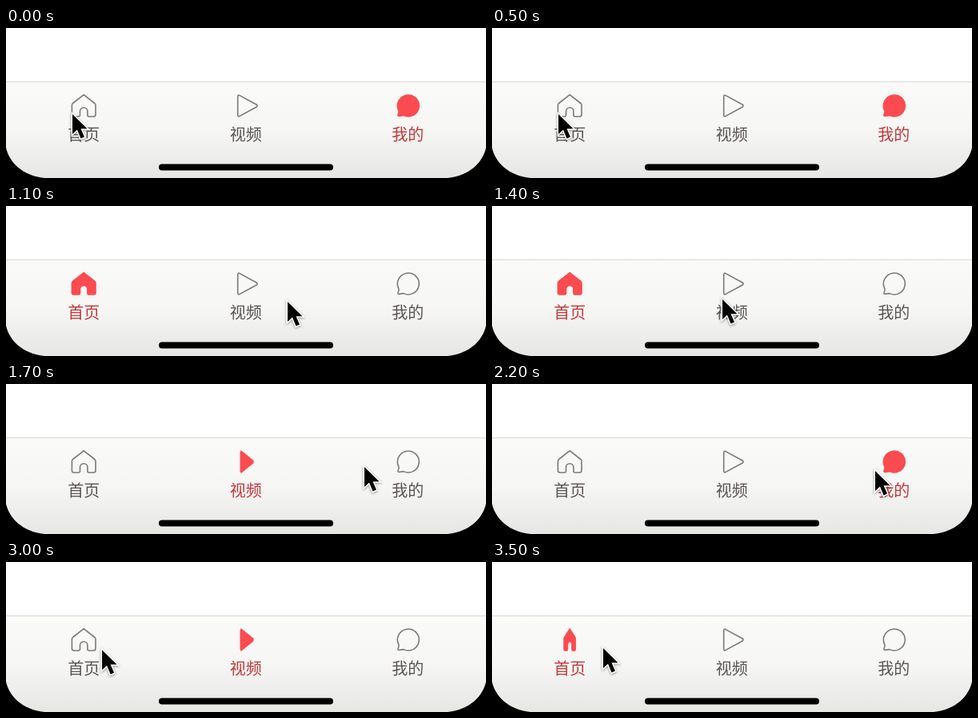
An HTML page that plays this animation: 600x188 px, repeating every 3600 ms.

```html
<!DOCTYPE html>
<html lang="zh-CN">
<head>
<meta charset="utf-8">
<title>标签栏</title>
<style>
  html, body { margin: 0; width: 100%; height: 100%; overflow: hidden; background: #fff; }
  svg { display: block; width: 600px; height: 188px; }
  text { font: 20px "Noto Sans CJK SC", "Noto Sans CJK", sans-serif; text-anchor: middle; fill: #595453; }
  .tab path { fill: none; stroke: #7d7978; stroke-width: 1.6; stroke-linejoin: round; }
  .tab.on path { fill: #fa4b50; stroke: #fa4b50; }
  .tab.on text { fill: #c5383a; }
  #cursor { filter: drop-shadow(0 1.5px 1.5px #0006); }
</style>
</head>
<body>
<svg viewBox="0 0 600 188">
  <defs>
    <linearGradient id="bar" x2="0" y2="1">
      <stop stop-color="#fafaf8"/>
      <stop offset=".5" stop-color="#f6f6f4"/>
      <stop offset="1" stop-color="#e6e6e4"/>
    </linearGradient>
  </defs>
  <rect y="68" width="600" height="120" fill="url(#bar)"/>
  <rect y="67" width="600" height="1" fill="#d9d9d7"/>
  <path d="M0 150C4 168 20 185 48 188H0ZM600 150C596 168 580 185 552 188H600Z"/>
  <rect x="191" y="170.5" width="218" height="8" rx="4"/>

  <g class="tab" transform="translate(97.2)">
    <path d="M0 83.6L13.8 94.5Q14.8 95.4 14.8 97V108.5Q14.8 111 12.3 111H6.5Q4.7 111 4.7 109V104.5A4.7 4.7 0 0 0-4.7 104.5V109Q-4.7 111-6.5 111H-12.3Q-14.8 111-14.8 108.5V97Q-14.8 95.4-13.8 94.5Z"/>
    <text y="140.5">首页</text>
  </g>
  <g class="tab" transform="translate(299.7)">
    <path d="M-10 86.2Q-10 83.2-7.5 84.6L13.4 96Q15.4 97.5 13.4 99L-7.5 110.4Q-10 111.8-10 108.8Z"/>
    <text y="140.5">视频</text>
  </g>
  <g class="tab" transform="translate(502.3)">
    <path d="M-12.3 109.8Q-12.7 109-11.7 107Q-11 105-11.5 103.5A13.45 13.45 0 1 1-5.3 109.6Q-7.3 109.8-10.3 110.3Q-12 110.6-12.3 109.8Z"/>
    <text y="140.5">我的</text>
  </g>

  <circle id="press" r="42.8" fill="none" stroke="#000" stroke-width="2.8"/>
  <path id="cursor" d="M1 2V27L7 21.5L11.5 32.5L16 30.6L11.5 20.3H19.5Z"
        stroke="#fff" stroke-width="3" paint-order="stroke"/>
</svg>
<script>
const LOOP = 3600, STEP = 100, SPIN = 250;
const HOME = 0, VIDEO = 1, MINE = 2;

// [time, x, y]
const path = [
  [0, 82, 106], [800, 82, 106], [1100, 351, 118], [1300, 287, 115], [1400, 287, 115],
  [1700, 447, 102], [1900, 480, 107], [2200, 478, 107], [2600, 287, 115], [2700, 287, 115],
  [3100, 88, 107], [3300, 86, 106], [3500, 138, 106], [3600, 138, 106]
];
// [time, selected tab]
const selections = [
  [-SPIN, MINE], [833, HOME], [1517, VIDEO], [1955, MINE], [2817, VIDEO], [3417, HOME]
];
const presses = [600, 1300, 2600];

const tabs = [...document.querySelectorAll(".tab")];
const cursor = document.getElementById("cursor");
const press = document.getElementById("press");

function cursorAt(t) {
  const i = path.findIndex(point => point[0] > t);
  const [t0, x0, y0] = path[i - 1], [t1, x1, y1] = path[i];
  const p = (t - t0) / (t1 - t0), ease = p * p * (3 - 2 * p);
  return [x0 + (x1 - x0) * ease, y0 + (y1 - y0) * ease];
}

function draw(t) {
  const [x, y] = cursorAt(t);
  cursor.setAttribute("transform", `translate(${x} ${y})`);
  press.setAttribute("transform", `translate(${x} ${y + 1.7})`);
  press.style.display = presses.some(p => t >= p && t < p + STEP) ? "" : "none";

  const [start, selected] = selections.findLast(s => s[0] <= t);
  const turn = Math.min(1, (t - start) / SPIN);
  tabs.forEach((tab, i) => {
    const on = i === selected;
    tab.classList.toggle("on", on);
    const width = on ? Math.abs(Math.cos(Math.PI * turn)) : 1;
    tab.firstElementChild.setAttribute("transform", `scale(${width} 1)`);
  });
}

function tick() {
  draw(Math.floor(performance.now() % LOOP / STEP) * STEP);
  requestAnimationFrame(tick);
}
tick();
</script>
</body>
</html>
```
